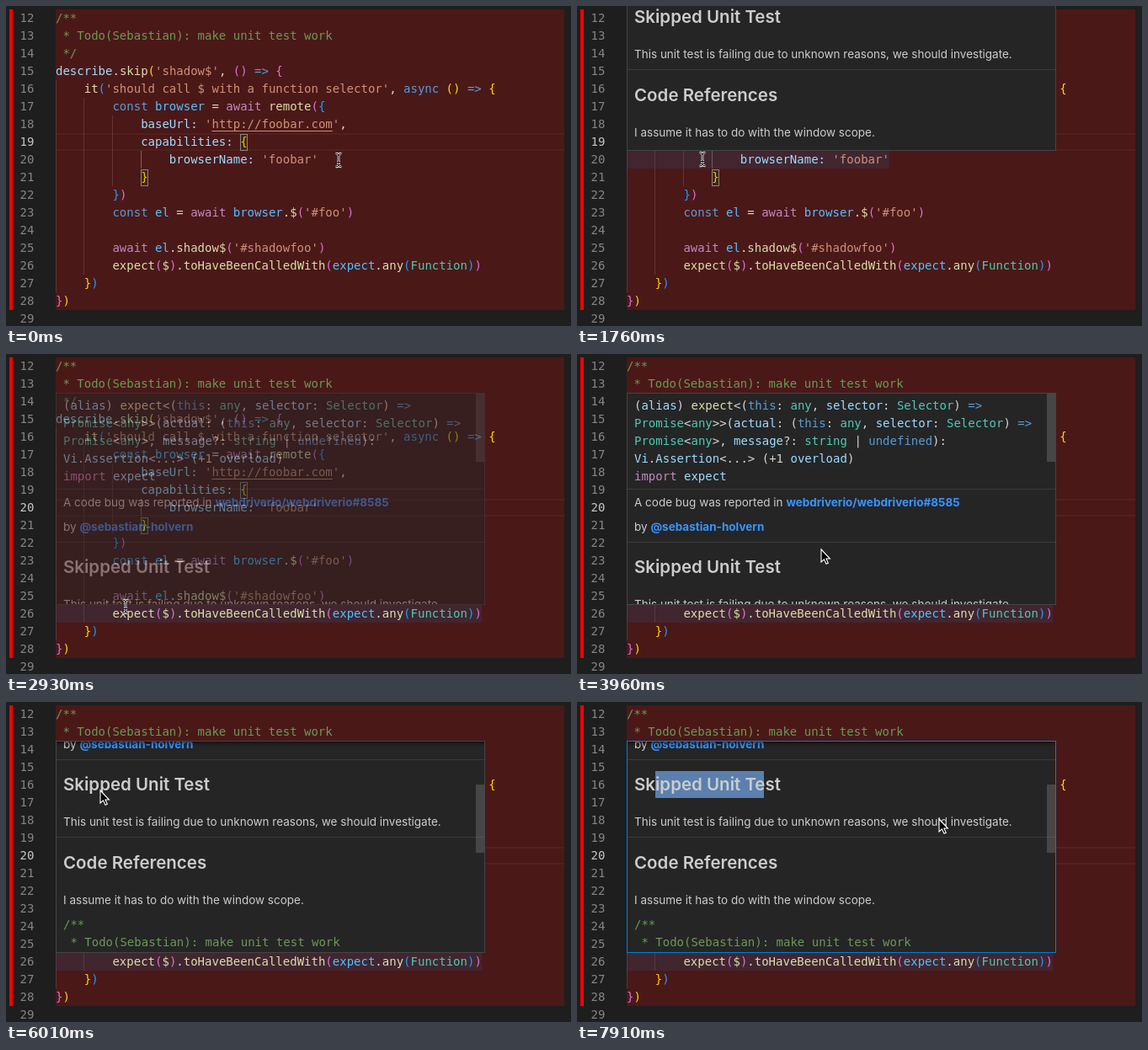
Recreate the animation shown at these times as an HTML page. Size 671 by 380 pixels, loop 8000 ms.

```html
<!DOCTYPE html>
<html lang="en">
<head>
<meta charset="utf-8">
<title>Editor hover</title>
<style>
html, body { margin: 0; width: 100%; height: 100%; overflow: hidden; background: #1e1e1e; }
#stage { position: relative; width: 671px; height: 380px; overflow: hidden; }
#stage div, #stage svg { position: absolute; box-sizing: border-box; }
.code { font: 14px/21px "DejaVu Sans Mono", monospace; white-space: pre; color: #d4d4d4; }
.text { font: 13.5px/20px Inter, sans-serif; white-space: pre; color: #ccc; left: 8px; }
.text b { color: #3794ff; }
.head { font-size: 20.5px; font-weight: 600; line-height: 32px; }
.rule { left: 0; width: 508px; height: 1px; background: #3b3b3c; }
.match { width: 9px; height: 20px; border: 1px solid #888; background: rgba(0, 100, 0, .1); }
#active { left: 59px; width: 604px; height: 21px; border: solid #282828; border-width: 2px 0; }
#red { left: 59px; top: 4px; width: 604px; height: 357px; background: rgba(255, 0, 0, .2); }
#bar { left: 4px; top: 4px; width: 4px; height: 357px; background: #f00; }
#range { left: 59px; height: 21px; background: rgba(38, 79, 120, .25); }
#caret { width: 2px; height: 21px; background: #aeafad; }
#tip { left: 59px; width: 510px; height: 252px; overflow: hidden; background: #252526; border: 1px solid #454545; }
#shade { width: 508px; height: 6px; box-shadow: #000 0 6px 6px -6px inset; }
#thumb { left: 498px; width: 10px; height: 81px; background: rgba(121, 121, 121, .4); }
#mark { left: 33px; top: 190px; height: 32px; background: #5b7fae; }
svg { overflow: visible; }
</style>
</head>
<body>
<div id="stage">
  <div id="active"></div>
  <div id="guides"></div>
  <div id="red"></div>
  <div id="bar"></div>
  <div id="range"></div>
  <div id="lines"></div>
  <div id="caret"></div>
  <div id="tip">
    <div id="doc"><div id="mark"></div></div>
    <div id="shade"></div>
    <div id="thumb"></div>
  </div>
  <svg id="beam" width="1" height="1" fill="none">
    <g id="i"><path d="M-3.5 -8Q0 -8 0 -5.5Q0 -8 3.5 -8M0 -6V6M-3.5 8Q0 8 0 5.5Q0 8 3.5 8M-2 2.5H2" stroke="#fff" stroke-width="2.6"/>
    <path d="M-3.5 -8Q0 -8 0 -5.5Q0 -8 3.5 -8M0 -6V6M-3.5 8Q0 8 0 5.5Q0 8 3.5 8M-2 2.5H2" stroke="#000"/></g>
  </svg>
  <svg id="arrow" width="1" height="1">
    <path d="M0 0V15L3.5 11.8L6 17.2L8.3 16.2L5.9 11H10.4Z" stroke="#fff" stroke-width="1.1"/>
  </svg>
</div>
<script>
const $ = id => document.getElementById(id);
const FRAME = 146.4, LOOP = 8000, COL = 8.43, LEFT = 59;
const lineTop = n => 4 + (n - 12) * 21;

// "~x" switches to colour x
const colors = {
  w: '#d4d4d4', g: '#6a9955', f: '#dcdcaa', s: '#ce9178', u: '#ce9178', k: '#569cd6', v: '#4fc1ff',
  p: '#9cdcfe', a: '#c586c0', t: '#4ec9b0', 1: '#ffd700', 2: '#da70d6', 3: '#179fff'
};
const paint = src => ('~w' + src).split('~').slice(1).map(part => {
  const line = part[0] === 'u' ? ';text-decoration:underline;text-underline-offset:3px' : '';
  const text = part.slice(1).replace(/</g, '&lt;');
  return `<span style="color:${colors[part[0]]}${line}">${text}</span>`;
}).join('');

function add(parent, cls, style, html = '') {
  const el = document.createElement('div');
  el.className = cls;
  el.innerHTML = html;
  for (const k in style) el.style[k] = typeof style[k] === 'number' ? style[k] + 'px' : style[k];
  parent.append(el);
  return el;
}

const comment = ['~g/**', '~g * Todo(Sebastian): make unit test work', '~g */'];
const source = [
  ...comment,
  "~pdescribe~w.~fskip~1(~s'shadow$'~w, ~2() ~k=> ~2{",
  "    ~fit~3(~s'should call $ with a function selector'~w, ~kasync ~1() ~k=> ~1{",
  '        ~kconst ~vbrowser ~w= ~aawait ~fremote~2(~3{',
  "            ~pbaseUrl: ~s'~uhttp://foobar.com~s'~w,",
  '            ~pcapabilities: ~1{',
  "                ~pbrowserName: ~s'foobar'",
  '            ~1}',
  '        ~3}~2)',
  "        ~kconst ~vel ~w= ~aawait ~vbrowser~w.~f$~2(~s'#foo'~2)",
  '',
  "        ~aawait ~vel~w.~fshadow$~2(~s'#shadowfoo'~2)",
  '        ~fexpect~2(~f$~2)~w.~ftoHaveBeenCalledWith~2(~vexpect~w.~fany~3(~tFunction~3)~2)',
  '    ~1}~3)',
  '~2}~1)',
  ''
];
const numbers = source.map((src, i) => {
  const top = lineTop(12 + i);
  add($('lines'), 'code', { left: LEFT, top }, paint(src));
  return add($('lines'), 'code', { left: 16.5, top }, 12 + i);
});
add($('lines'), 'match', { left: 278, top: lineTop(19) + 1 });
add($('lines'), 'match', { left: 160, top: lineTop(21) + 1 });

[[0, 16, 27], [4, 17, 26], [8, 18, 21], [12, 20, 20]].forEach(([col, from, to]) =>
  add($('guides'), '', {
    left: Math.floor(LEFT + col * COL), top: lineTop(from), width: 1,
    height: (to - from + 1) * 21, background: col === 12 ? '#707070' : '#404040'
  }));

// Hover card contents
const doc = $('doc');
const codeRows = (top, rows) => rows.forEach((src, i) =>
  add(doc, 'code', { left: 8, top: top + i * 21 }, paint(src)));
codeRows(4, [
  '(~palias~w) ~fexpect~w<(~kthis~w: ~tany~w, ~pselector~w: ~tSelector~w) ~k=>',
  '~tPromise~w<~tany~w>>(~pactual~w: (~kthis~w: ~tany~w, ~pselector~w: ~tSelector~w) ~k=>',
  '~tPromise~w<~tany~w>, ~pmessage~w?: ~tstring ~w| ~kundefined~w):',
  '~pVi~w.~pAssertion~w<...> (+1 ~poverload~w)',
  '~aimport ~pexpect'
]);
codeRows(362, [
  ...comment,
  "~pdescribe~w.~fskip~w(~s'shadow$'~w, () ~k=> ~w{",
  "    ~fit~w(~s'should call $ with a function selector'~w, ~kasync ~w()",
  '~k=> ~w{'
]);
[113, 176, 268].forEach(top => add(doc, 'rule', { top }));
[
  [119, 'A code bug was reported in <b>webdriverio/webdriverio#8585</b>'],
  [148, 'by <b>@sebastian-holvern</b>'],
  [240, 'This unit test is failing due to unknown reasons, we should investigate.'],
  [333, 'I assume it has to do with the window scope.']
].forEach(([top, html]) => add(doc, 'text', { top }, html));
add(doc, 'text head', { top: 190 }, 'Skipped Unit Test');
add(doc, 'text head', { top: 283 }, 'Code References');

// Tracks: [step, ...values], linear in between
const pointer = [
  [4, 394.5, 183], [5, 375, 188], [6, 305, 203], [7, 205, 211], [8, 158, 196], [9, 149, 182],
  [15, 149, 182], [16, 149, 205], [17, 145, 268], [18, 142, 300],
  [23, 142, 300], [24, 165, 288], [25, 218, 260], [26, 270, 240], [27, 290, 232],
  [29, 290, 232], [33, 255, 250], [35, 241, 257], [37, 235, 253], [39, 160, 185], [41, 112, 105],
  [42, 104, 101], [44, 93, 97], [45, 93, 97], [49, 222, 98], [50, 222, 98],
  [52, 356, 139], [53, 398, 139], [54, 430, 139]
];
const scrolling = [[28, 0], [30, 45], [32, 130], [34, 196], [35, 206], [36, 206], [39, 155]];
const marking = [[45, 0], [49, 129]];

function at(track, step) {
  const next = track.findIndex(k => k[0] > step);
  if (next < 0) return track[track.length - 1].slice(1);
  if (next === 0) return track[0].slice(1);
  const a = track[next - 1], b = track[next], u = (step - a[0]) / (b[0] - a[0]);
  return a.slice(1).map((v, i) => v + (b[i + 1] - v) * u);
}
const place = (el, x, y) => { el.style.left = x + 'px'; el.style.top = y + 'px'; };
const show = (el, on) => { el.style.display = on ? '' : 'none'; };

function draw(time) {
  const step = Math.floor(time % LOOP / FRAME);
  const within = (a, b) => step >= a && step < b;
  const line = step < 13 ? 19 : 20;
  const early = within(11, 13), late = step >= 20;

  $('active').style.top = lineTop(line) + 'px';
  numbers.forEach((el, i) => { el.style.color = i + 12 === line ? '#c6c6c6' : '#858585'; });

  show($('caret'), within(2, 5) || within(9, 16));
  place($('caret'), line === 19 ? 286 : 152, lineTop(line));

  show($('range'), early || late);
  $('range').style.top = lineTop(early ? 20 : 26) + 'px';
  $('range').style.width = (early ? 37 : 60) * COL + 'px';

  const scroll = Math.round(at(scrolling, step)[0]);
  show($('tip'), early || late);
  $('tip').style.top = (early ? -80 : 46) + 'px';
  $('tip').style.opacity = step === 11 ? .15 : step === 20 ? .5 : 1;
  $('tip').style.borderColor = step >= 45 ? '#007fd4' : '#454545';
  doc.style.top = -(early ? 114 : scroll) + 'px';
  $('thumb').style.top = Math.round(scroll * .33) + 'px';
  show($('thumb'), late);
  show($('shade'), scroll > 0);
  $('mark').style.width = at(marking, step)[0] + 'px';

  const [x, y] = at(pointer, step);
  show($('beam'), step < 24);
  show($('arrow'), step >= 24);
  place($('beam'), x, y);
  place($('arrow'), x, y);
}

function tick(now) {
  draw(now);
  requestAnimationFrame(tick);
}
draw(0);
requestAnimationFrame(tick);
</script>
</body>
</html>
```
